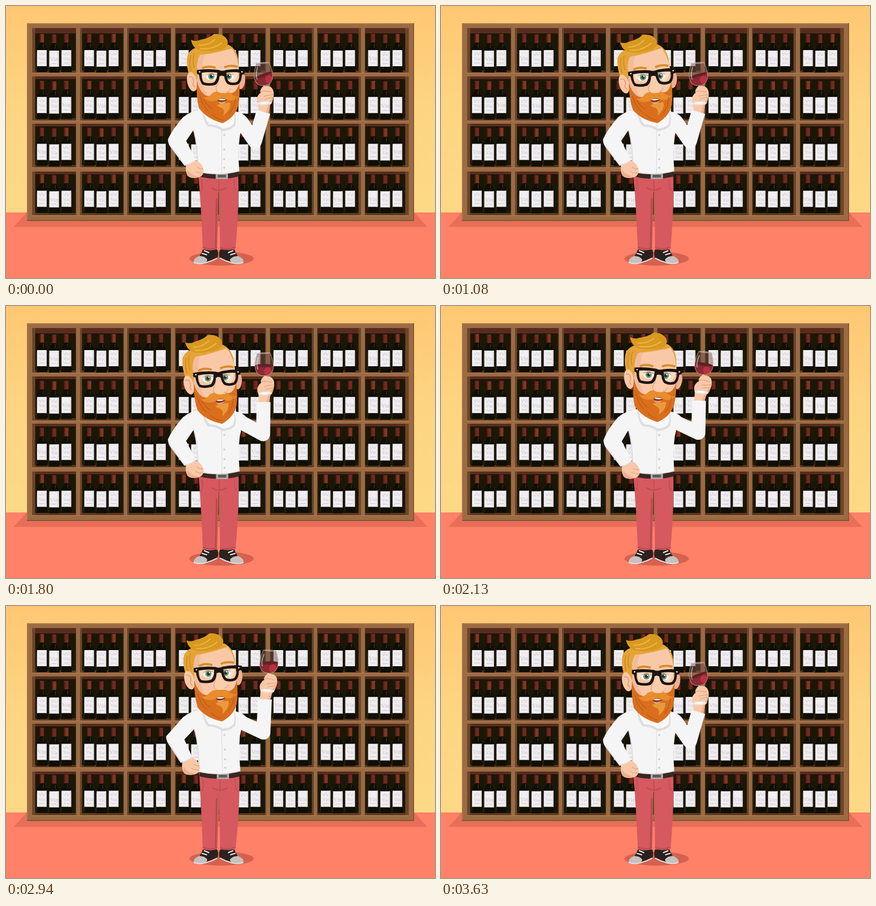
An HTML page with a canvas that plays this animation: 800x506 px, repeating every 3690 ms.

```html
<!DOCTYPE html>
<html lang="en">
<head>
<meta charset="utf-8">
<title>Wine taster</title>
<style>
html, body { margin: 0; width: 100%; height: 100%; overflow: hidden; background: #fdd07c; }
canvas { display: block; }
</style>
</head>
<body>
<canvas id="stage" width="800" height="506"></canvas>
<script>
const W = 800, H = 506, LOOP = 3690, STEP = 30;
const stage = document.getElementById('stage').getContext('2d');
let ctx = stage;

const SKIN = '#f9c9a7', SKIN_DARK = '#eeb090', SKIN_LINE = '#d8977a';
const SHIRT = '#f6f5f6', SHADE = '#dedde0', PANTS = '#d5595e', PANTS_DARK = '#b84b50';
const HAIR = '#e5a437', HAIR_DARK = '#d9991f', BEARD = '#d96f1d', BEARD_LIGHT = '#e88c2c';
const BLACK = '#1b1512';

// ---------- drawing helpers ----------
function fill(d, color) { ctx.fillStyle = color; ctx.fill(new Path2D(d)); }
function line(d, color, width = 1) {
  ctx.strokeStyle = color;
  ctx.lineWidth = width;
  ctx.stroke(new Path2D(d));
}
function rect(x, y, w, h, color) { ctx.fillStyle = color; ctx.fillRect(x, y, w, h); }
function oval(x, y, rx, ry, color, angle = 0) {
  ctx.fillStyle = color;
  ctx.beginPath();
  ctx.ellipse(x, y, rx, ry, angle, 0, 7);
  ctx.fill();
}
function group(draw, x = 0, y = 0, degrees = 0) {
  ctx.save();
  ctx.translate(x, y);
  ctx.rotate(degrees * Math.PI / 180);
  draw();
  ctx.restore();
}
function seeded(seed) {
  return () => (seed = (seed * 16807) % 2147483647) / 2147483647;
}

// ---------- room ----------
function drawBottle(x, y, kind) {
  fill(`M${x - 4} ${y} h8 v17 q1 5 4 8 q2 2 2 6 v40 h-20 v-40 q0 -4 2 -6 q3 -3 4 -8z`, '#100e05');
  rect(x - 4, y, 8, 16, kind ? '#74291f' : '#84361f');
  rect(x - 4, y, 2, 16, '#541e17');
  rect(x + 2, y + 18, 1, 7, '#49412b');
  line(`M${x - 9.5} ${y + 34}V${y + 69}`, '#38301d');
  rect(x - 9, y + 30, 18, 30, '#f0eef0');
  rect(x + 7, y + 30, 2, 30, '#dddbdf');
  ctx.fillStyle = '#c6c5ca';
  ctx.textAlign = 'center';
  ctx.font = (kind === 1 ? 11 : 8) + 'px "Liberation Serif", serif';
  ctx.fillText('Vin', x, y + 49);
  if (kind !== 1) line(`M${x - 5} ${y + 35}l2 5 3 -6 3 6 2 -5`, '#c9c8cc', .8);
  line(`M${x - 5} ${y + 54}h10`, '#c6c5ca', 1);
}

function drawCell(col, row) {
  const x = 49.5 + col * 88.5, y = [41, 131, 219, 308][row];
  const bottom = [124, 213, 300, 389][row], w = 81.5, h = bottom - y;
  const lean = (3.5 - col) / 3.5;
  rect(x, y, w, h, '#1b1707');
  rect(x, y, w, row ? 5 : 10, '#572c1e');
  rect(x, bottom - 4, w, 4, '#5a3921');
  const left = 1 + 4 * Math.max(lean, 0), right = 1 + 5 * Math.max(-lean, 0);
  rect(x, y, left, h, '#6d4529');
  rect(x + w - right, y, right, h, '#6d4529');
  for (let i = 0; i < 3; i++) {
    drawBottle(89.7 + col * 88.2 + (i - 1) * 22.8, 52 + row * 87.2 + (i === 1 ? 1 : 0), (col + row * 2 + i) % 3);
  }
}

function drawRoom() {
  const wall = ctx.createLinearGradient(0, 0, 0, 384);
  wall.addColorStop(0, '#ffc773');
  wall.addColorStop(.5, '#fdd581');
  wall.addColorStop(1, '#fdd986');
  rect(0, 0, W, H, wall);
  const random = seeded(41);
  for (let i = 0; i < 900; i++) {
    rect(random() * W, random() * 384, 1 + random() * 2, 1, i % 2 ? '#ffe39c55' : '#efb75f44');
  }
  rect(0, 384, W, H - 384, '#ff8168');
  fill('M39 384H761L786 411H14Z', '#e96e59');

  rect(39, 32, 722, 368, '#9b6b43');
  for (let row = 0; row < 4; row++) for (let col = 0; col < 8; col++) drawCell(col, row);
  rect(39, 32, 722, 2, '#ab784d');
  rect(39, 32, 2, 368, '#a87449');
  rect(759, 32, 2, 368, '#855a38');
  rect(39, 398, 722, 2, '#805735');
  for (const y of [124, 213, 300, 389]) rect(48, y, 704, 1.5, '#ac794e');
}

// ---------- figure ----------
function drawShoe() {
  fill('M-32 0H-5Q-2 8 -5 16Q-17 22 -28 25Q-44 29 -49 24Q-49 17 -38 12Q-34 6 -32 0Z', '#2b211f');
  fill('M-49 24Q-50 17 -39 12Q-29 12 -24 18Q-23 22 -28 25Q-44 29 -49 24Z', '#c6c1bf');
  line('M-49 24Q-40 28 -28 25Q-16 22 -5 16', '#e2dedc', 2);
  line('M-34 7l10 3M-30 2l10 4', '#f4efed', 2);
}

function drawLegs(hip) {
  oval(402, 470, 60, 13, '#d6614e');
  group(drawShoe, 399, 453);
  group(() => { ctx.scale(-1, 1); drawShoe(); }, 394, 453);
  const l = 358 + hip, r = 433 + hip, c = 397 + hip;
  fill(`M${l} 308H${r}Q${r + 2} 370 428 452Q413 456 399 452L398 346H${c - 1}L394 452Q380 457 367 452Q364 370 ${l} 308Z`, PANTS);
  line(`M${c} 323V345`, PANTS_DARK, 1.5);
  line(`M${c - 14} 338Q${c} 347 ${c + 14} 338`, PANTS_DARK, 1.5);
  line('M367 449Q380 454 394 450M399 450Q414 454 428 449', PANTS_DARK, 2);
  line('M393 358L391 449', PANTS_DARK, 3);
  line(`M${l + 7} 323q3 12 -2 22M${r - 7} 323q-2 13 3 21`, PANTS_DARK, 1.2);
}

function drawBelt(hip) {
  group(() => {
    fill('M359 307Q398 317 434 307V317Q398 326 359 317Z', '#392823');
    rect(391, 311, 23, 11, '#aaa6a4');
    rect(395, 314, 15, 5, '#625955');
  }, hip, 0);
}

function drawTorso(hip) {
  const l = 357 + hip, r = 435 + hip, pit = 349 + hip;
  fill(`M366 192Q356 193 349 200L${pit} 228Q${l - 1} 250 ${l} 308Q${l + 39} 317 ${r} 307Q${r - 3} 270 436 242Q443 216 437 202Q428 195 424 193Z`, SHIRT);
  line(`M${pit} 229Q${l} 250 ${l + 1} 307`, SHADE, 2);
  line(`M${l} 308Q${l + 39} 317 ${r} 307`, SHADE, 1.5);
  fill('M366 192Q366 212 376 224Q392 224 404 233Q420 231 427 223Q431 210 425 193Z', SHADE);
  fill('M368 190Q369 208 379 220Q393 220 404 228Q418 227 424 220Q428 208 424 190Z', '#f9f8f9');
  line(`M402 232Q403 270 ${402 + hip} 311`, SHADE, 1.2);
  for (const y of [240, 267, 285, 301]) oval(407 + hip * (y - 230) / 80, y, 2, 2, '#d2d1d5');
}

function drawRestingArm(shift) {
  const h = shift * 2, y = shift * 1.6, e = 302 + shift;
  group(() => {
    fill('M337 291Q349 284 358 289Q368 296 369 308Q367 318 357 319Q344 322 338 315Q333 303 337 291Z', SKIN);
    fill('M338 304Q344 315 362 318Q345 323 338 315Z', SKIN_DARK);
    line('M356 300q7 4 12 3M353 308q8 4 14 3', SKIN_LINE);
  }, h, y);
  fill(`M369 192Q345 194 330 207Q310 230 ${e} ${248 + y}Q${e} ${257 + y} ${e + 6} ${264 + y}L${333 + h} ${297 + y}Q${346 + h} ${295 + y} ${354 + h} ${286 + y}L${336 + shift} ${251 + y / 2}L350 230Z`, SHIRT);
  line(`M${e + 4} ${260 + y}L${333 + h} ${296 + y}Q${345 + h} ${295 + y} ${353 + h} ${287 + y}`, SHADE, 2);
}

function drawGlass(tilt, slope) {
  const bowl = new Path2D('M-12 -58C-17 -44 -21 -28 -11 -19C-7 -15 7 -15 11 -19C21 -28 17 -44 12 -58Z');
  ctx.fillStyle = '#7d544e80';
  ctx.fill(bowl);
  ctx.save();
  ctx.clip(bowl);
  group(() => {
    rect(-30, 0, 60, 40, '#8a2a32');
    oval(0, 0, 17, 3, '#5f2226');
    oval(7, 11, 7, 8, '#b93240');
  }, 0, -35, -tilt - slope);
  ctx.restore();
  ctx.strokeStyle = '#cdb9b2aa';
  ctx.lineWidth = 1;
  ctx.stroke(bowl);
  oval(0, -58, 12, 2, '#d8c4bc66');
  line('M-10 -51Q-15 -37 -12 -28', '#ffffff77', 2);
  line('M0 -16V15', '#dcc7bd', 2.5);
  oval(0, 17, 13, 3.5, '#f1e6e0');
  oval(-1, 16.5, 8, 1.5, '#fffaf7');
}

function drawRaisedArm(p) {
  group(() => {
    fill('M-9 5L-9 -15Q-14 -27 -6 -33L10 -48Q20 -46 21 -36Q22 -23 13 -13L9 5Z', SKIN);
    fill('M4 5Q7 -10 19 -28Q20 -18 13 -12L9 5Z', SKIN_DARK);
    group(() => drawGlass(p.tilt, p.slope), 3.5, -33);
    fill('M-4 -39Q0 -50 8 -48Q19 -45 17 -37L3 -32Q-4 -34 -4 -39Z', SKIN);
    fill('M-8 -28Q-9 -36 1 -36Q19 -41 21 -32Q19 -25 8 -25Q-4 -21 -8 -28Z', SKIN);
    line('M-3 -38Q7 -40 17 -36M2 -29Q13 -31 20 -31M5 -24Q12 -25 18 -26', SKIN_LINE);
  }, p.wristX, p.wristY, p.tilt);
  ctx.lineJoin = 'round';
  line(`M422 209Q434 209 440 217L${p.elbowX} ${p.elbowY}L${p.wristX} ${p.wristY}`, SHIRT, 26);
  ctx.lineJoin = 'miter';
}

function drawEye(x, closed, lid) {
  if (closed > .7) {
    line(`M${x - 9} 132Q${x} 127 ${x + 9} 132`, SKIN_LINE, 2);
    line(`M${x - 8} 135Q${x} 132 ${x + 8} 136`, '#c98669', 1);
    return;
  }
  ctx.save();
  ctx.beginPath();
  ctx.ellipse(x, 131, 10, 7 * (1 - closed), 0, 0, 7);
  ctx.clip();
  rect(x - 12, 122, 24, 18, '#fffdf9');
  oval(x, 131 + lid * 2, 6, 6, '#6f9f7d');
  oval(x, 131 + lid * 2, 3, 3, '#26352e');
  oval(x + 2, 129 + lid * 2, 1.2, 1.2, '#fff');
  rect(x - 12, 120, 24, 5 + lid * 7, '#eab191');
  ctx.restore();
  line(`M${x - 10} ${129 + lid * 3}Q${x} ${122 + lid * 8} ${x + 10} ${129 + lid * 3}`, '#b57d62');
}

function drawGlasses() {
  fill('M356 119Q376 116 397 119Q403 122 410 119Q430 116 446 119L444 127L440 128Q439 143 432 146Q421 149 413 145Q408 140 407 131Q402 128 398 131Q397 143 390 147Q376 150 366 146Q361 139 360 128L356 126ZM365 124Q364 137 369 142Q380 145 388 142Q394 136 394 124Q380 122 365 124ZM411 124Q411 136 416 141Q424 144 431 141Q436 135 436 124Q424 122 411 124Z', BLACK);
  oval(361, 122.5, 1.5, 1.2, '#fff');
  oval(440, 122.5, 1.5, 1.2, '#fff');
}

function drawFace(p) {
  line('M366 116Q376 110 391 115M407 114Q418 109 432 113', '#d98c2c', 4);
  drawEye(383, p.wink, p.lid);
  drawEye(415, 0, p.lid);
  fill('M366 125L377 124L368 138Z', '#ffffff66');
  fill('M425 124L435 124L425 142L419 142Z', '#ffffff55');
  fill('M398 124Q397 143 392 151Q391 161 402 162Q418 163 419 153Q417 145 410 137L408 124Z', '#fbcdaa');
  line('M398 132Q396 144 392 151Q391 159 397 161', SKIN_LINE);
  line('M411 159Q418 159 419 153', SKIN_LINE);
  drawGlasses();
}

function drawBeard() {
  fill('M356 139Q360 157 370 165Q382 172 392 161Q406 156 419 162Q430 162 435 143Q437 167 433 186Q427 207 404 218Q374 210 360 190Q354 169 356 139Z', BEARD);
  fill('M393 173Q403 169 413 173Q410 179 402 179Q396 179 393 173Z', '#7a3524');
  fill('M395 174Q403 171 411 174Q403 177 395 174Z', '#fff5eb');
  fill('M396 178Q404 180 410 177Q408 182 402 182Q398 182 396 178Z', '#f1a27e');
  fill('M404 160Q390 156 382 165Q376 171 367 170Q380 182 397 174Q404 169 411 174Q424 180 435 168Q427 170 421 164Q412 157 404 160Z', BEARD_LIGHT);
  fill('M393 184Q406 180 418 180Q420 193 405 204Q409 194 403 190Q397 188 393 184Z', '#ea993a');
  line('M361 164Q365 184 377 195M368 172Q375 186 384 191M428 170Q427 188 416 200M384 201Q393 211 404 212', '#bd5a17', 1.2);
}

function drawHead(p) {
  fill('M340 124Q335 104 339 90Q347 77 361 77L415 72Q430 80 433 99L435 126L424 145L355 145Z', HAIR);
  group(() => {
    oval(439, 140, 7, 15, SKIN_DARK, .15);
    oval(347, 141, 9, 18, SKIN, -.22);
    line('M341 132Q350 129 350 142Q346 146 352 151', SKIN_LINE, 1.5);
  }, 0, p.nod);
  fill('M357 123Q354 104 362 91Q385 89 421 79Q431 90 434 116L434 165Q420 184 395 184Q365 178 356 150Z', SKIN);
  fill('M357 123Q354 104 362 91L371 90Q364 109 368 125Q364 151 378 170Q359 164 356 145Z', '#f2bc9c');
  fill('M345 63Q354 67 362 63Q379 60 388 52Q407 51 413 64Q416 76 403 81Q379 86 362 83Q348 79 345 63Z', HAIR_DARK);
  line('M362 79Q386 82 403 68M359 73Q377 74 390 62', '#edb64a', 2);
  line('M345 92Q341 105 345 121M351 88Q347 103 351 116', '#c98920', 1.5);
  group(drawBeard, 0, p.nod * .3);
  group(() => drawFace(p), 0, p.nod);
}

// ---------- motion ----------
const FIELDS = ['time', 'angle', 'headX', 'headY', 'nod', 'elbowX', 'elbowY',
  'wristX', 'wristY', 'tilt', 'arm', 'hip', 'slope'];
const POSES = [
  [0, 0, 0, 0, 0, 464, 252, 480, 197, -3, 0, 0, 22],
  [600, 0, 0, 0, 0, 464, 252, 480, 197, -3, 0, 0, -12],
  [1080, -4, -1, 0, 0, 464, 252, 480, 197, -3, 0, 0, 16],
  [1500, -9.5, -3, 3, 3, 478, 243, 480, 184, -6, -1, 1, 10],
  [2130, 3, 0, -2, 0, 480, 236, 481, 176, 5, 1, 0, -8],
  [2490, 0, 0, 0, 0, 479, 237, 482, 177, 10, 0, 0, 0],
  [2670, 0, 0, 0, 0, 479, 237, 483, 177, 13, 0, 0, 4],
  [3210, -5.5, -3, -4, -8, 481, 234, 482, 170, -6, -7, 4, 0],
  [3630, 0, 0, 0, 0, 464, 252, 480, 197, -3, 0, 0, 22]
];
const clamp = v => Math.max(0, Math.min(1, v));
const pulse = (t, start, end, ramp) => clamp(Math.min((t - start) / ramp, (end - t) / ramp));

function slopeAfter(i, n) {
  const a = POSES[i], b = POSES[i + 1];
  return a && b ? (b[n] - a[n]) / (b[0] - a[0]) : 0;
}
// Flows through a pose in mid-move, and rests where the direction turns.
function tangent(i, n) {
  const before = slopeAfter(i - 1, n), after = slopeAfter(i, n);
  return before * after > 0 ? 2 * before * after / (before + after) : 0;
}

function poseAt(t) {
  const i = Math.max(1, POSES.findIndex(pose => pose[0] >= t));
  const from = POSES[i - 1], to = POSES[i];
  const span = to[0] - from[0], u = (t - from[0]) / span;
  const ease = u * u * (3 - 2 * u);
  const pose = {};
  FIELDS.forEach((name, n) => {
    const curve = tangent(i - 1, n) * u * (1 - u) ** 2 - tangent(i, n) * u * u * (1 - u);
    pose[name] = from[n] + (to[n] - from[n]) * ease + span * curve;
  });
  pose.wink = pulse(t, 1290, 1740, 120);
  pose.lid = pulse(t, 2940, 3480, 210);
  return pose;
}

const room = document.createElement('canvas');
room.width = W;
room.height = H;
ctx = room.getContext('2d');
drawRoom();
ctx = stage;

function render(now) {
  const t = Math.min(Math.floor((now % LOOP) / STEP) * STEP, 3630);
  const p = poseAt(t);
  ctx.drawImage(room, 0, 0);
  drawLegs(p.hip);
  drawRaisedArm(p);
  drawBelt(p.hip);
  drawTorso(p.hip);
  drawRestingArm(p.arm);
  group(() => {
    ctx.translate(-404, -210);
    drawHead(p);
  }, 404 + p.headX, 210 + p.headY, p.angle);
}

const start = performance.now();
function tick() {
  render(performance.now() - start);
  requestAnimationFrame(tick);
}
tick();
</script>
</body>
</html>
```
